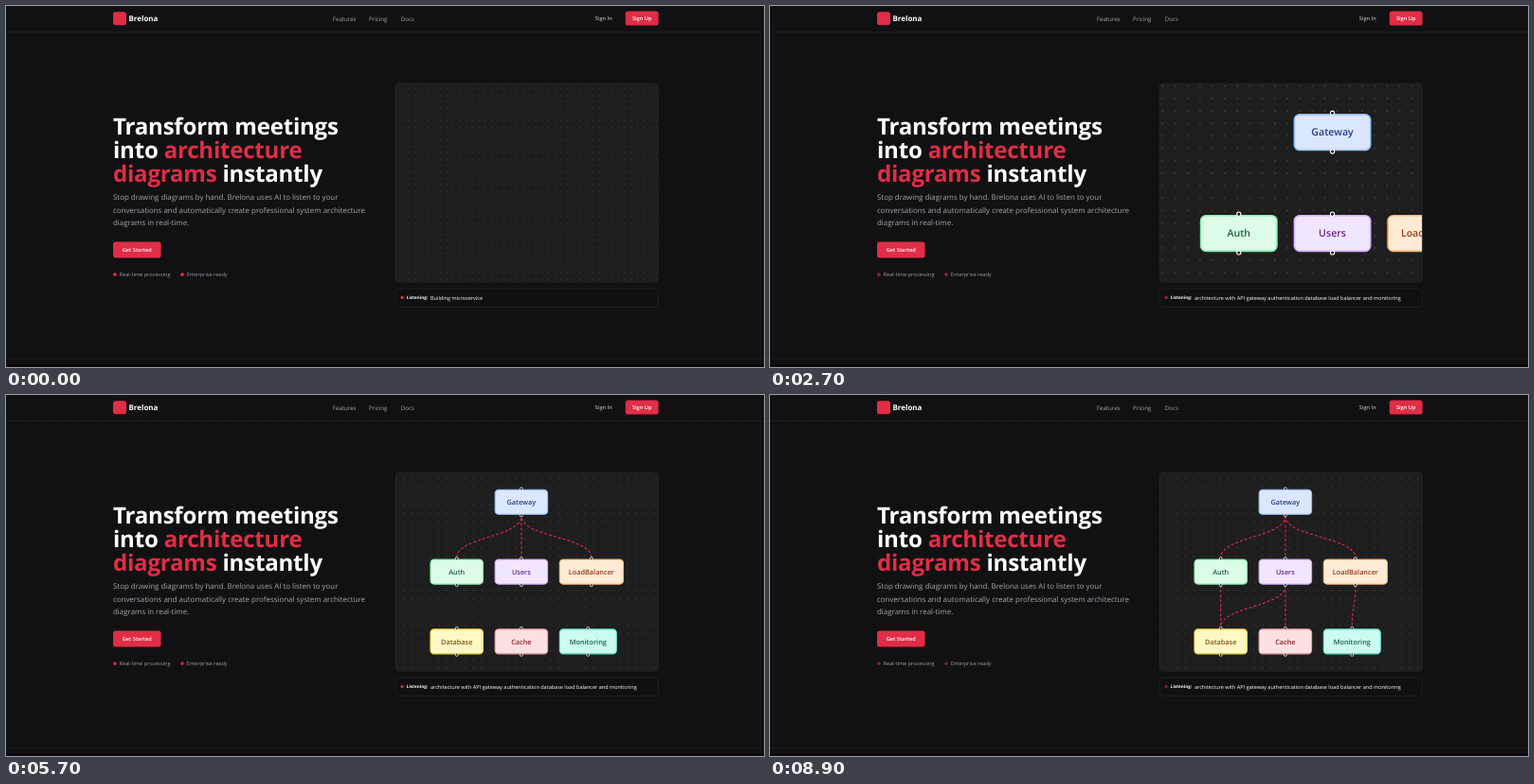
An HTML page that plays this animation: 800 px wide and 382 px high, repeating every 9 s.

```html
<!DOCTYPE html>
<html lang="en">
<head>
<meta charset="utf-8">
<title>Meetings into diagrams</title>
<style>
  html, body { margin: 0; width: 100%; height: 100%; overflow: hidden; background: #111113; }
  svg { display: block; width: 100%; height: 100%; }
  text { font-family: "Open Sans", "Noto Sans", sans-serif; text-rendering: geometricPrecision; }
  .red { fill: #e12d45; }
  .brand { font-size: 7.95px; font-weight: 700; fill: #fff; }
  .nav { font-size: 6.15px; fill: #a6a6ac; }
  .sign { font-size: 5.6px; font-weight: 600; fill: #b0b0b6; }
  .action { font-size: 5.65px; font-weight: 600; fill: #fff; text-anchor: middle; }
  .title { font-size: 24.1px; font-weight: 700; letter-spacing: -.01em; fill: #fff; }
  .lead { font-size: 7.92px; fill: #a6a6ac; }
  .note { font-size: 5.58px; fill: #9c9ca2; }
  .label { font-size: 4.6px; font-weight: 700; fill: #fff; }
  .speech { font-size: 5.54px; font-weight: 500; fill: #fff; }
  .node text { font-size: 7.3px; font-weight: 600; text-anchor: middle; }
  .node rect { stroke-width: 1.1; }
  .node circle { fill: #1a1a1e; stroke: #fff; stroke-width: .75; }
  .edge { fill: none; stroke: #dc2743; stroke-width: 1.1; stroke-dasharray: 3 2; }
  .frame { fill: none; stroke: #2b2b2e; stroke-width: .6; }
</style>
</head>
<body>
<svg viewBox="0 0 800 382">
  <defs>
    <pattern id="grid" width="18.95" height="18.95" patternUnits="userSpaceOnUse">
      <path d="M0 .25H18.95M.25 0V18.95" stroke="#fff" stroke-opacity=".015" stroke-width=".5"/>
    </pattern>
    <pattern id="dots" x="416.2" y="84.3" width="9.07" height="9.07" patternUnits="userSpaceOnUse">
      <circle cx="4.53" cy="4.53" r=".52" fill="#5c5c5e"/>
    </pattern>
    <clipPath id="panel"><rect x="411.3" y="82" width="277" height="210" rx="3.8"/></clipPath>
  </defs>

  <rect width="800" height="382" fill="#111113"/>
  <rect y="27" width="800" height="346" fill="url(#grid)"/>
  <rect y="27" width="800" height=".6" fill="#252528"/>
  <rect y="373" width="800" height=".6" fill="#202023"/>
  <rect y="379.4" width="800" height="2.6" fill="#09070a"/>

  <rect class="red" x="113" y="6.2" width="14" height="14" rx="2.6"/>
  <text class="brand" x="129.5" y="16.3">Brelona</text>
  <text class="nav" x="344.8" y="15.6">Features</text>
  <text class="nav" x="383" y="15.6">Pricing</text>
  <text class="nav" x="416.8" y="15.6">Docs</text>
  <text class="sign" x="621.8" y="15.3">Sign In</text>
  <rect class="red" x="653.8" y="5.6" width="34.8" height="15" rx="2.7"/>
  <text class="action" x="671.2" y="15.2">Sign Up</text>

  <text class="title" x="113" y="135.7">Transform meetings</text>
  <text class="title" x="113" y="160.9">into <tspan class="red">architecture</tspan></text>
  <text class="title" x="113" y="186.1"><tspan class="red">diagrams</tspan> instantly</text>
  <text class="lead" x="113" y="204.7">Stop drawing diagrams by hand. Brelona uses AI to listen to your</text>
  <text class="lead" x="113" y="218.5">conversations and automatically create professional system architecture</text>
  <text class="lead" x="113" y="232.2">diagrams in real-time.</text>
  <rect class="red" x="113" y="249.5" width="50.6" height="17" rx="2.7"/>
  <text class="action" x="138.3" y="260.1">Get Started</text>
  <circle class="red pulse" cx="114.9" cy="284.1" r="1.85"/>
  <text class="note" x="119.6" y="286">Real-time processing</text>
  <circle class="red pulse" cx="186" cy="284.1" r="1.85"/>
  <text class="note" x="190.8" y="286">Enterprise ready</text>

  <rect x="411" y="81.8" width="277.6" height="210.5" rx="4" fill="#1e1e1f"/>
  <g clip-path="url(#panel)">
    <g id="view">
      <rect x="100" y="-100" width="820" height="560" fill="url(#dots)"/>
      <g id="edges"></g>
      <g id="nodes"></g>
    </g>
  </g>
  <rect class="frame" x="411.2" y="82" width="277.2" height="210.2" rx="4"/>

  <rect class="frame" x="411.2" y="299" width="277.2" height="19.7" rx="4" style="fill:#101012"/>
  <circle class="red pulse" cx="418.1" cy="308.6" r="1.75"/>
  <text class="label" x="422.8" y="310.4">Listening:</text>
  <text class="speech" id="speech" x="448" y="310.5"></text>
</svg>
<script>
const LOOP = 9000;
const NODE_START = 800, NODE_STEP = 600, FIT_TIME = 350;
const EDGE_START = 4800, EDGE_STEP = 400;
const CENTER = { x: 549.75, y: 187.1 }, PANEL = { w: 277.5, h: 210.5 };
const MAX_ZOOM = 1.487, FILL = 0.829, NODE_H = 26.9, INSET = 0.5;
const WORDS = ("Building microservice architecture with API gateway " +
  "authentication database load balancer and monitoring").split(" ");

const node = (name, col, row, fill, line, ink, w = 56.3) =>
  ({ name, x: 448 + 68 * col, y: 100 + 73.6 * row, w, fill, line, ink });

const nodes = [
  node("Gateway", 1, 0, "#dbe7fe", "#93c0fb", "#263a8c"),
  node("Auth", 0, 1, "#dcfce7", "#86efac", "#1c6438"),
  node("Users", 1, 1, "#f1e6ff", "#d3b0fb", "#6624a0"),
  node("LoadBalancer", 2, 1, "#ffebd5", "#fbba78", "#963a1a", 68),
  node("Database", 0, 2, "#fef8c3", "#fbde4a", "#80501a"),
  node("Cache", 1, 2, "#fce0e2", "#f9a3a6", "#961f2e"),
  node("Monitoring", 2, 2, "#ccfbef", "#62e8d0", "#17605a", 60.8)
];
const links = [[0, 1], [0, 2], [0, 3], [1, 4], [2, 4], [2, 5], [3, 6]];

const find = id => document.getElementById(id);
const mid = n => n.x + n.w / 2;

find("nodes").innerHTML = nodes.map(n => `<g class="node">
  <rect x="${n.x + INSET}" y="${n.y + INSET}" width="${n.w - 2 * INSET}" height="${NODE_H - 2 * INSET}"
    rx="3.8" fill="${n.fill}" stroke="${n.line}"/>
  <text x="${mid(n)}" y="${n.y + 16.1}" fill="${n.ink}">${n.name}</text>
  <circle cx="${mid(n)}" cy="${n.y - 0.6}" r="1.45"/>
  <circle cx="${mid(n)}" cy="${n.y + NODE_H + 0.6}" r="1.45"/></g>`).join("");

find("edges").innerHTML = links.map(([from, to]) => {
  const a = nodes[from], b = nodes[to];
  const top = a.y + NODE_H + 1.5, end = b.y - 1.5, half = (top + end) / 2;
  return `<path class="edge" d="M${mid(a)} ${top}C${mid(a)} ${half} ${mid(b)} ${half} ${mid(b)} ${end}"/>`;
}).join("");

const nodeParts = [...find("nodes").children];
const edgeParts = [...find("edges").children];
const pulses = document.querySelectorAll(".pulse");

// Camera that centres the given nodes inside the panel
function fit(shown) {
  const left = Math.min(...shown.map(n => n.x));
  const right = Math.max(...shown.map(n => n.x + n.w));
  const top = Math.min(...shown.map(n => n.y));
  const bottom = Math.max(...shown.map(n => n.y + NODE_H));
  return {
    x: (left + right) / 2,
    y: (top + bottom) / 2,
    s: Math.min(MAX_ZOOM, FILL * PANEL.w / (right - left), FILL * PANEL.h / (bottom - top))
  };
}
const fits = nodes.map((_, i) => fit(nodes.slice(0, i + 1)));

const clamp = v => Math.max(0, Math.min(1, v));
const ease = p => p < 0.5 ? 4 * p ** 3 : 1 - 4 * (1 - p) ** 3;
const mix = (a, b, p) => a + (b - a) * p;

function camera(t) {
  let cam = { x: 544, y: 150, s: 0.74 };
  fits.forEach((goal, i) => {
    const p = ease(clamp((t - NODE_START - i * NODE_STEP) / FIT_TIME));
    cam = { x: mix(cam.x, goal.x, p), y: mix(cam.y, goal.y, p), s: mix(cam.s, goal.s, p) };
  });
  return cam;
}

function show(parts, t, start, step) {
  parts.forEach((el, i) => { el.style.display = t >= start + i * step ? "" : "none"; });
}

function draw(t) {
  const { x, y, s } = camera(t);
  find("view").setAttribute("transform",
    `translate(${CENTER.x} ${CENTER.y}) scale(${s}) translate(${-x} ${-y})`);
  show(nodeParts, t, NODE_START, NODE_STEP);
  show(edgeParts, t, EDGE_START, EDGE_STEP);
  edgeParts.forEach(e => { e.style.strokeDashoffset = 5 - t % 500 / 100; });
  pulses.forEach(p => { p.style.opacity = 0.75 + 0.25 * Math.cos(Math.PI * t / 1000); });
  const heard = WORDS.slice(0, 2 + Math.floor(t / 200));
  find("speech").textContent = heard.slice(-10).join(" ");
}

function tick() {
  draw(performance.now() % LOOP);
  requestAnimationFrame(tick);
}
tick();
</script>
</body>
</html>
```
